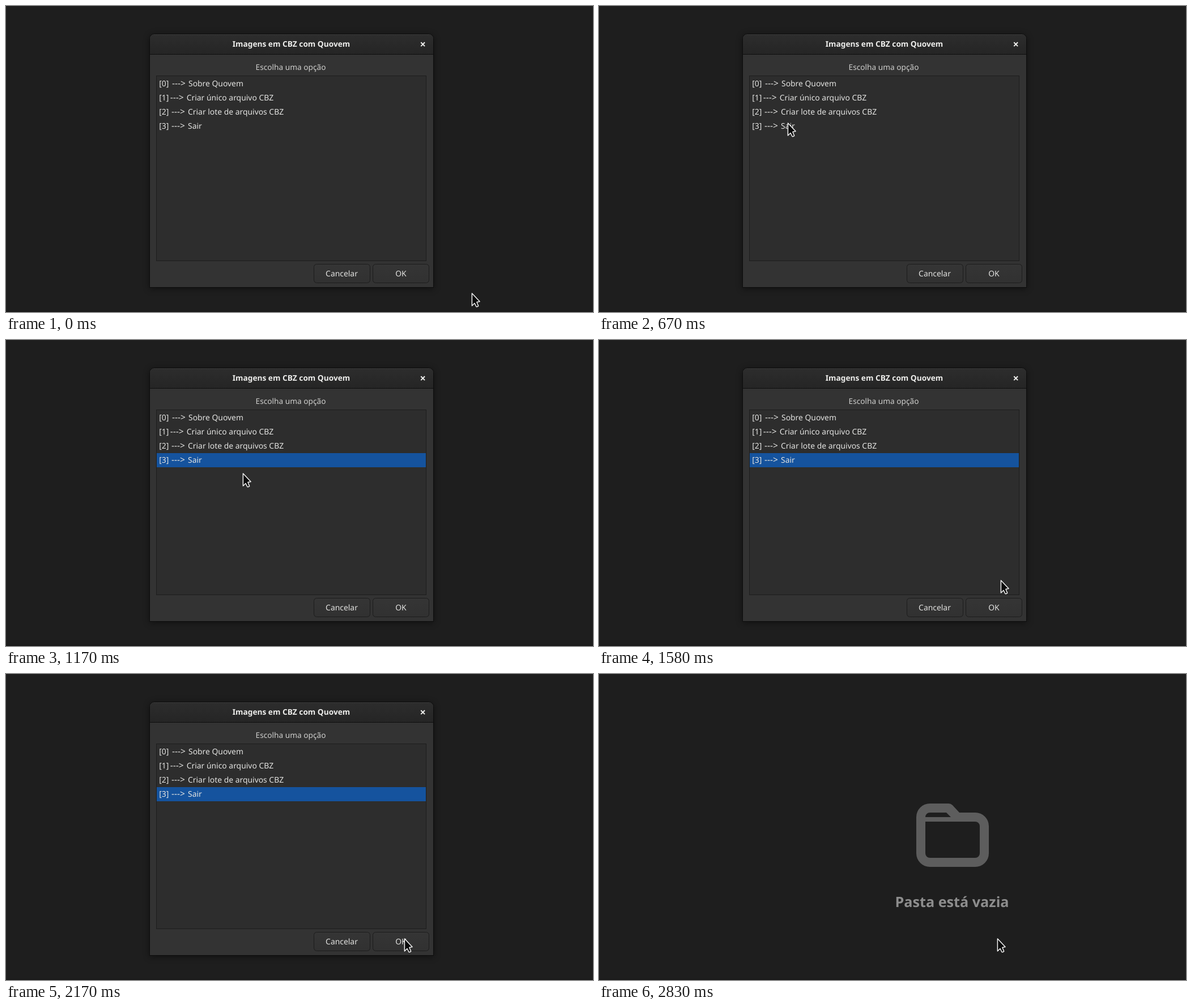
An HTML page that plays this animation: 1036 px wide and 541 px high, repeating every 3010 ms.

```html
<!DOCTYPE html>
<html lang="pt">
<head>
<meta charset="utf-8">
<title>Diálogo</title>
<style>
  html, body { margin: 0; width: 100%; height: 100%; overflow: hidden; background: #1e1e1e; }
  svg { display: block; width: 100vw; height: 100vh; }
  text { font: 13.9px "Noto Sans", "Open Sans", sans-serif; fill: #e4e4e2; text-rendering: geometricPrecision; }
  .mid { text-anchor: middle; }
  .title { font-size: 13.7px; font-weight: 700; fill: #eeeeec; }
  .prompt { font-size: 13.7px; fill: #cfcfcd; }
  .arrow { font-size: 15.5px; }
  .empty { font-size: 25.2px; font-weight: 700; fill: #8d8d8d; }
  #dialog { filter: drop-shadow(0 2px 6px rgba(0, 0, 0, .45)); }
</style>
</head>
<body>
<svg viewBox="0 0 1036 541">
  <defs>
    <linearGradient id="bar" x2="0" y2="1"><stop stop-color="#2d2d2d"/><stop offset="1" stop-color="#252525"/></linearGradient>
    <linearGradient id="face" x2="0" y2="1"><stop stop-color="#353535"/><stop offset="1" stop-color="#313131"/></linearGradient>
  </defs>
  <rect width="1036" height="541" fill="#1e1e1e"/>
  <rect y="539" width="1036" height="2" fill="#191919"/>

  <g id="folder">
    <path fill="#5d5d5d" fill-rule="evenodd" d="M584 229h33q4 0 7 3l12 13h28a24 24 0 0 1 24 24v48a24 24 0 0 1-24 24h-80a24 24 0 0 1-24-24v-64a24 24 0 0 1 24-24z
      M584 245h29l8 8h-45a8 8 0 0 1 8-8z
      M576 261h88a8 8 0 0 1 8 8v48a8 8 0 0 1-8 8h-80a8 8 0 0 1-8-8z"/>
    <text class="mid empty" x="623" y="412">Pasta está vazia</text>
  </g>

  <g id="dialog">
    <path fill="#333" stroke="#0d0d0d" d="M253.5 497.5v-440a8 8 0 0 1 8-8h485a8 8 0 0 1 8 8v440z"/>
    <path fill="url(#bar)" d="M254 85v-27.500a7.500 7.500 0 0 1 7.500-7.500h485a7.500 7.500 0 0 1 7.500 7.500v27.500z"/>
    <path stroke="#3a3a3a" d="M261 50.500h486"/>
    <path stroke="#0e0e0e" d="M254 85.500h500"/>
    <text class="mid title" x="503.500" y="72">Imagens em CBZ com Quovem</text>
    <path stroke="#eeeeec" stroke-width="2" d="M732.300 64.300l6.800 6.800m0-6.800l-6.800 6.800"/>
    <text class="mid prompt" x="502.500" y="113">Escolha uma opção</text>
    <rect x="265.500" y="123.500" width="476" height="327" fill="#2d2d2d" stroke="#1d1d1d"/>
    <rect id="selection" x="266" y="200" width="475" height="25" fill="#15539e"/>
    <g id="rows"></g>
    <g stroke="#1c1c1c" fill="url(#face)">
      <rect x="543.500" y="456.500" width="99" height="33" rx="5"/>
      <rect x="647.500" y="456.500" width="99" height="33" rx="5"/>
    </g>
    <rect id="pressed" x="647.500" y="456.500" width="99" height="33" rx="5" fill="#1e1e1e" stroke="#1a1a1a"/>
    <text class="mid" x="592.500" y="478">Cancelar</text>
    <text class="mid" x="697" y="478">OK</text>
  </g>

  <path id="cursor" fill="#0a0a0a" stroke="#f4f4f4" stroke-width="1.500" stroke-linejoin="round"
    d="M.4 1V23L5 18.500 8 24.500q2.200 .6 3.700-1.300L8.900 16.500 14.100 15.500Z"/>
</svg>
<script>
const LOOP = 3010, STEP = 250 / 3;
const el = id => document.getElementById(id);

const options = [
  ['Sobre Quovem', 322],
  ['Criar único arquivo CBZ', 318.7],
  ['Criar lote de arquivos CBZ', 321],
  ['Sair', 321]
];
el('rows').innerHTML = options.map(([label, x], i) => {
  const y = 142 + 25 * i;
  return `<text x="270.300" y="${y}">[${i}]</text>` +
    `<text class="arrow" x="${x - 29}" y="${y}">---&gt;</text>` +
    `<text x="${x}" y="${y}">${label}</text>`;
}).join('');

const smooth = u => u * u * (3 - 2 * u);
const easeIn = u => u * u;
const easeOut = u => u * (2 - u);

// Pointer stops: step, x, y, easing used to get there
const stops = [
  [0, 822, 507],
  [7, 333, 206, smooth],
  [11, 333, 206, smooth],
  [14, 418, 235, easeIn],
  [19, 709, 424, easeOut],
  [21, 711, 457, easeOut],
  [25, 703, 467, easeOut]
];

function pointerAt(step) {
  const next = stops.findIndex(s => s[0] > step);
  if (next < 0) return stops[stops.length - 1].slice(1, 3);
  const [t0, x0, y0] = stops[next - 1], [t1, x1, y1, ease] = stops[next];
  const k = ease((step - t0) / (t1 - t0));
  return [x0 + (x1 - x0) * k, y0 + (y1 - y0) * k];
}

const show = (id, on) => el(id).setAttribute('visibility', on ? 'visible' : 'hidden');

function draw(now) {
  const step = Math.floor((now % LOOP + 3.4) / STEP);
  const closed = step >= 34;
  el('dialog').style.display = closed ? 'none' : '';
  show('folder', closed);
  show('selection', step >= 10);
  el('pressed').setAttribute('opacity', step < 31 ? 0 : step < 32 ? 0.6 : 1);
  el('cursor').setAttribute('transform', `translate(${pointerAt(step).map(Math.round)})`);
}

const start = performance.now();
function tick() {
  draw(performance.now() - start);
  requestAnimationFrame(tick);
}
tick();
</script>
</body>
</html>
```
